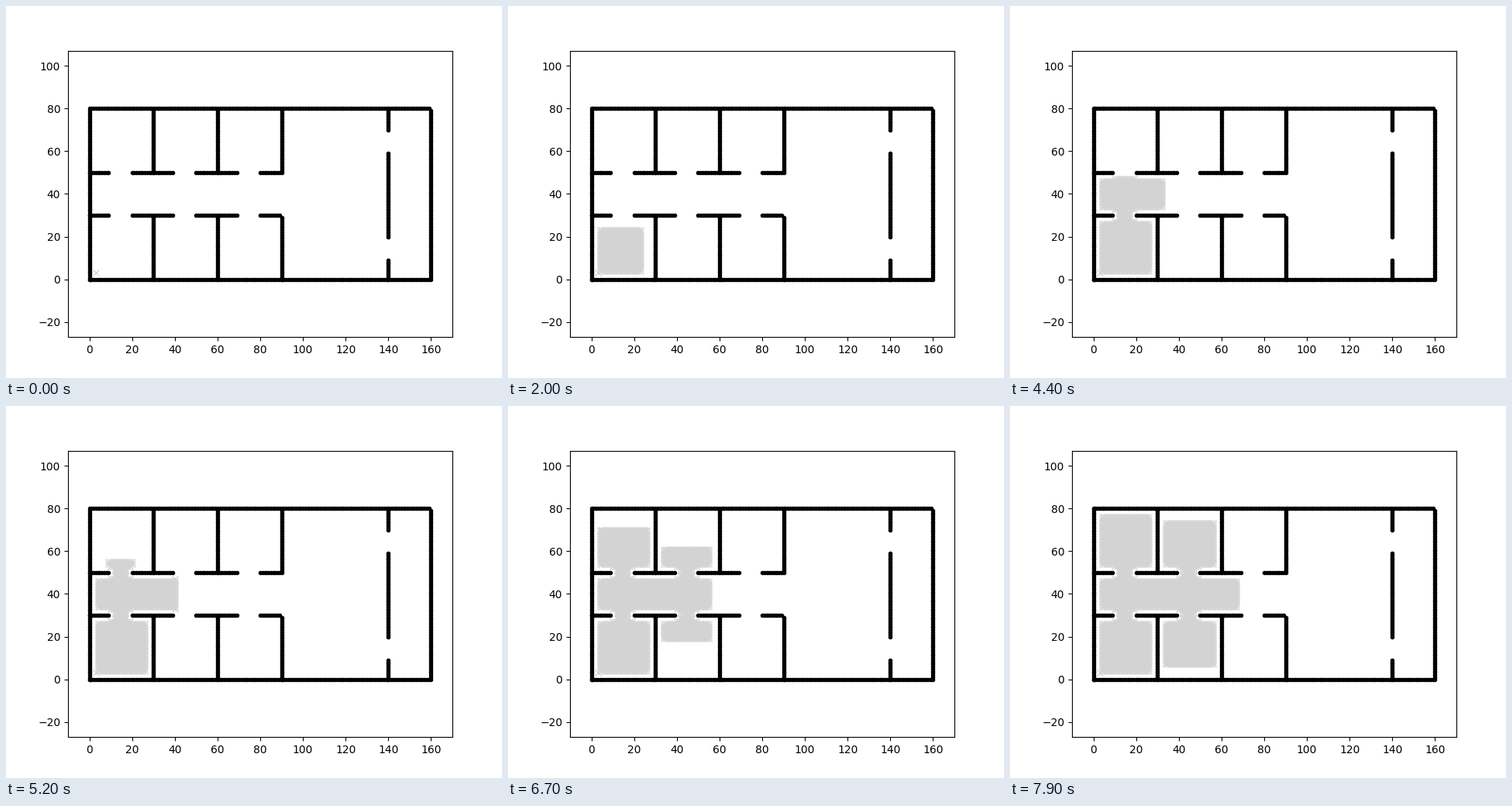
These frames come from a looping animation (640 by 480 pixels, 8 s). A matplotlib script:

```python
import numpy as np
import matplotlib.pyplot as plt
from matplotlib.animation import FuncAnimation

FRAMES = 80
START = (3, 3)
WIDTH, HEIGHT = 160, 80
CLEARANCE = 3


def row(y, x0, x1):
    return [(x, y) for x in range(x0, x1)]


def col(x, y0, y1):
    return [(x, y) for y in range(y0, y1)]


def build_walls():
    walls = row(0, 0, WIDTH) + row(HEIGHT, 0, WIDTH)
    walls += col(0, 0, HEIGHT) + col(WIDTH, 0, HEIGHT)
    for y in (30, 50):
        for x0, x1 in ((0, 10), (20, 40), (50, 70), (80, 90)):
            walls += row(y, x0, x1)
    for x in (30, 60, 90):
        walls += col(x, 0, 30) + col(x, 50, HEIGHT)
    for y0, y1 in ((0, 10), (20, 60), (70, HEIGHT)):
        walls += col(140, y0, y1)
    return np.array(walls)


def free_cells(walls):
    """Grid cells farther from every wall dot than the clearance."""
    gx, gy = np.mgrid[0:WIDTH + 1, 0:HEIGHT + 1]
    free = np.ones(gx.shape, bool)
    for x, y in walls:
        free &= (gx - x) ** 2 + (gy - y) ** 2 > CLEARANCE ** 2
    return free


def flood(free):
    """Breadth-first search over eight neighbours, one level per step."""
    seen, order, counts = {START}, [START], []
    frontier = [START]
    for _ in range(FRAMES):
        counts.append(len(order))
        reached = []
        for x, y in frontier:
            for dx in (-1, 0, 1):
                for dy in (-1, 0, 1):
                    cell = (x + dx, y + dy)
                    if free[cell] and cell not in seen:
                        seen.add(cell)
                        reached.append(cell)
        order += reached
        frontier = reached
    return np.array(order), counts


walls = build_walls()
cells, counts = flood(free_cells(walls))

fig, ax = plt.subplots(figsize=(6.4, 4.8), dpi=100)
ax.plot(walls[:, 0], walls[:, 1], ".k")
visited, = ax.plot([], [], "x", color="lightgray")

half = 90 * (0.77 * 480) / (0.775 * 640)
ax.set_xlim(-10, 170)
ax.set_ylim(40 - half, 40 + half)
ax.set_xticks(range(0, 161, 20))
ax.set_yticks(range(-20, 101, 20))


def update(i):
    shown = cells[:counts[i]]
    visited.set_data(shown[:, 0], shown[:, 1])
    return visited,


anim = FuncAnimation(fig, update, frames=FRAMES, interval=100,
                     repeat=True, repeat_delay=0)
plt.show()
```
